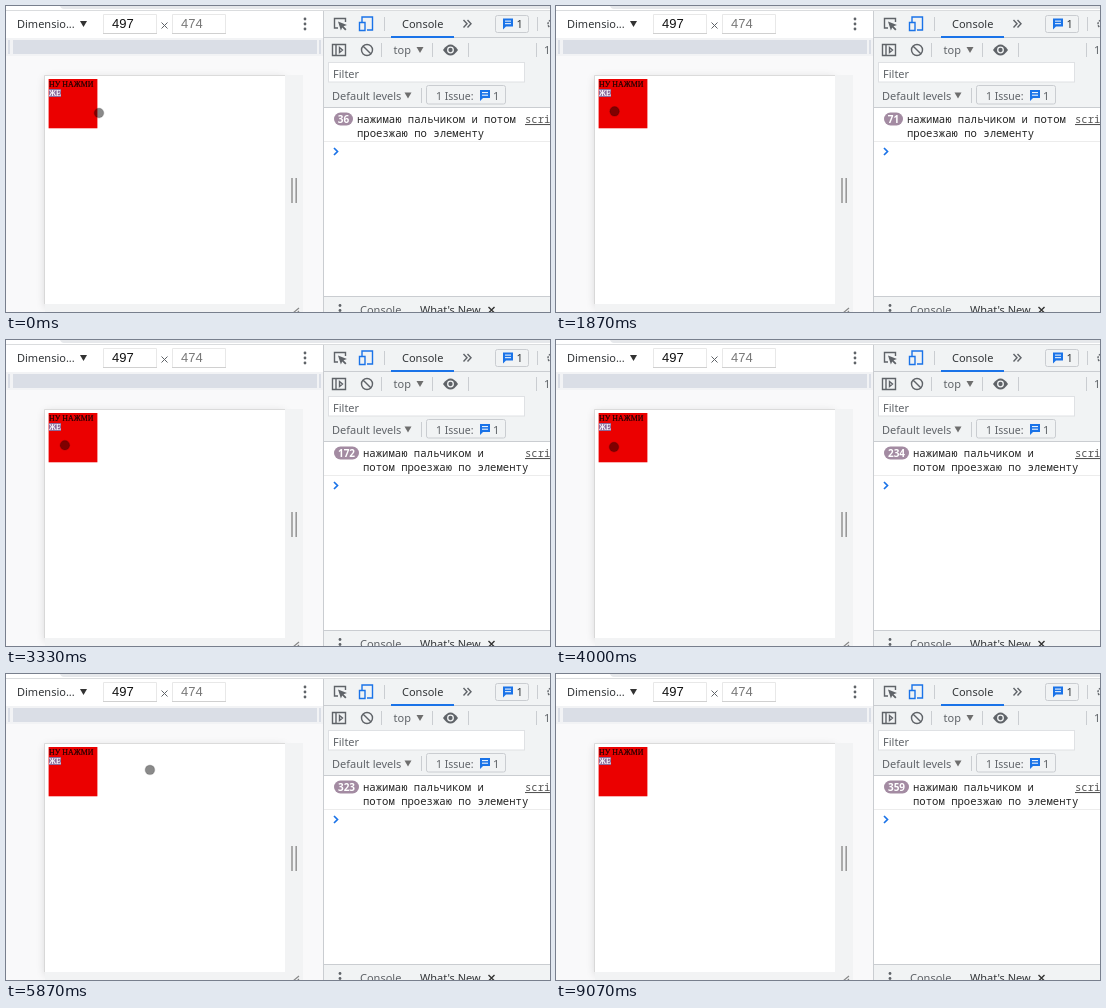
An HTML page that plays this animation: 544 by 306 pixels, repeating every 9.27 s.

```html
<!DOCTYPE html>
<html lang="ru">
<head>
<meta charset="utf-8">
<title>Touch move counter</title>
<style>
  html, body { margin: 0; width: 100%; height: 100%; overflow: hidden; background: #fff; }
  svg { display: block; width: 100vw; height: 100vh; }
  text { font: 11px "Noto Sans", sans-serif; fill: #5f6368; white-space: pre; }
  .dark { fill: #333639; }
  .field { font: 13px "Liberation Sans", Arial, sans-serif; fill: #111; }
  .muted { fill: #777; }
  .small { font-size: 10.5px; }
  .log { font: 10.6px "Noto Sans Mono", monospace; fill: #222; }
  .page { font: 7.9px "Liberation Serif", "Times New Roman", serif; fill: #200; stroke: #200; stroke-width: .2; }
  .page.selected { fill: #fff; stroke: #fff; }
  .badge { font: bold 10px "Noto Sans", sans-serif; fill: #fff; text-anchor: middle; }
  .line { stroke: #cacdd1; fill: none; }
  .icon { stroke: #5f6368; stroke-width: 1.4; fill: none; }
  .blue { stroke: #1a73e8; }
</style>
</head>
<body>
<svg viewBox="0 0 544 306">
  <defs>
    <filter id="shadow" x="-10%" y="-10%" width="120%" height="120%">
      <feGaussianBlur stdDeviation="5"/>
    </filter>
    <g id="message">
      <path d="M0 0h10v8H3l-3 3z" fill="#1a73e8"/>
      <path d="M2 2.6h6M2 5.2h6" stroke="#fff"/>
    </g>
    <path id="down" d="M0 0h7l-3.500 6z"/>
    <g id="dots"><circle r="1.4"/><circle cy="5" r="1.4"/><circle cy="10" r="1.4"/></g>
  </defs>

  <!-- Device panel -->
  <rect width="544" height="306" fill="#fff"/>
  <path d="M54 0h490v3H58q-3 0-4-3" fill="#e6e8eb"/>
  <path class="line" d="M0 4.500h544" stroke-opacity=".7"/>
  <rect y="32" width="317" height="274" fill="#f9f9fa"/>
  <rect y="32" width="317" height="18" fill="#f2f3f5"/>
  <path d="M7 34h304v14H7zM2 34h2v14H2zM313 34h2v14h-2z" fill="#dadee6"/>
  <text class="dark" x="11" y="22">Dimensio...</text>
  <use href="#down" x="74" y="15" fill="#333"/>
  <path d="M97.500 8.500h53v19h-53zM166.500 8.500h53v19h-53z" fill="#fff" stroke="#e8e8e8"/>
  <path d="M97 27.500h54M166 27.500h54" stroke="#d0d0d0"/>
  <text class="field" x="106" y="22">497</text>
  <text class="field muted" x="175" y="22">474</text>
  <path class="icon" d="M155.500 16.500l6 6m0-6l-6 6" style="stroke-width:1"/>
  <use href="#dots" x="299" y="13" fill="#5f6368"/>

  <rect x="39" y="72" width="240" height="229" opacity=".15" filter="url(#shadow)"/>
  <path d="M279 69h18v237H39v-8h240z" fill="#f2f3f4"/>
  <rect x="38.500" y="69" width="240.500" height="229" fill="#fff"/>
  <path d="M38.500 298V69.500H279" stroke="#ccc" stroke-width=".7" fill="none"/>
  <path d="M286 172v25M290.200 172v25" stroke="#999" stroke-width="1.600"/>
  <path d="M287 307l6-5M291 307l2-2" stroke="#888" stroke-width="1.200"/>

  <rect x="42.600" y="73" width="48.800" height="49.300" fill="#eb0000"/>
  <text class="page" x="43" y="81">НУ НАЖМИ</text>
  <rect x="43" y="83" width="12" height="8" fill="#8b6a9a"/>
  <text class="page selected" x="43" y="89.800">ЖЕ</text>
  <circle id="touch" r="4.700" fill-opacity=".46" stroke="#000" stroke-width="1.400" stroke-opacity=".16"/>

  <!-- Console panel -->
  <rect x="317" y="5" width="227" height="97" fill="#f1f3f4"/>
  <path class="line" d="M317.500 5v301M318 31.500h226M318 101.500h226"/>

  <path class="icon" d="M332 22h-3.500v-9.500h11V16"/>
  <path d="M332 15.500l9 3.500-3.500 1.300 3 3-1.300 1.200-3-3-1.300 3z" fill="#5f6368"/>
  <path class="icon blue" d="M356 16v-5h10.500v13H361M353.500 16.500h5.500v8h-5.500z"/>
  <path class="line" d="M378.500 11v14M531.500 11v14M375.500 37v14M426.500 37v14M462.500 37v14M530.500 37v14M415.500 82v15"/>
  <text class="dark" x="396" y="22">Console</text>
  <path d="M385 31h63" stroke="#1a73e8" stroke-width="2"/>
  <path class="icon" d="M457.500 14l3.500 3.700-3.500 3.700M461.500 14l3.500 3.700-3.500 3.700"/>
  <rect class="line" x="489.500" y="9.500" width="33" height="17" rx="2"/>
  <use href="#message" x="497" y="12.500"/>
  <text class="dark" x="510.500" y="22">1</text>
  <circle class="icon" cx="546" cy="18" r="4" stroke-dasharray="2 1"/>

  <path class="icon" d="M326.500 38.500h13v11h-13zM330 38.500v11M333.500 41.500l3 2.500-3 2.500z"/>
  <path class="icon" d="M357.200 40.200l7.600 7.600" stroke-width="1.700"/>
  <circle class="icon" cx="361" cy="44" r="5.500"/>
  <text x="387.500" y="48">top</text>
  <use href="#down" x="410.500" y="41" fill="#6e6e6e"/>
  <path d="M437 44q7.500-11 15 0q-7.500 11-15 0z" fill="#5f6368"/>
  <circle cx="444.500" cy="44" r="2.800" fill="#5f6368" stroke="#f1f3f4" stroke-width="1.300"/>
  <text x="538" y="48">1 hidden</text>

  <rect x="322.500" y="56.500" width="196" height="19.500" fill="#fff" stroke="#dfe1e4"/>
  <text x="327" y="71.500">Filter</text>
  <text x="326" y="93.500">Default levels</text>
  <use href="#down" x="398.500" y="86.500" fill="#6e6e6e"/>
  <rect class="line" x="420.500" y="79.500" width="79" height="18.500" rx="2"/>
  <text class="small" x="430" y="93.500">1 Issue:</text>
  <use href="#message" x="474" y="84"/>
  <text x="487" y="93.500">1</text>

  <rect id="pill" x="328" y="106.500" height="13" rx="6.500" fill="#a38ba2"/>
  <text id="count" class="badge" y="116.800"></text>
  <text id="first" class="log" y="117"></text>
  <text id="second" class="log" y="131"></text>
  <text class="log" x="519" y="117" text-decoration="underline" style="fill:#555">script.js</text>
  <path d="M318 135.500h226" stroke="#ececec"/>
  <path class="icon blue" d="M328 142l3.500 3.500-3.500 3.500" style="stroke-width:1.700"/>

  <rect x="318" y="291" width="226" height="15" fill="#f1f3f4"/>
  <path class="line" d="M318 290.500h226"/>
  <use href="#dots" x="334" y="299.500" fill="#5f6368"/>
  <text x="354" y="308">Console</text>
  <text class="dark" x="414" y="308">What's New</text>
  <path class="icon" d="M482.500 301l6 6m0-6l-6 6" style="stroke:#333"/>
</svg>
<script>
  const LOOP = 9270, STEP = 1000 / 15;
  const el = id => document.getElementById(id);
  const touch = el('touch'), pill = el('pill'), count = el('count');
  const first = el('first'), second = el('second');

  // Key moments; longer stretches between them are scribbled.
  const keys = [
    { at: 0, x: 93, y: 107, n: 36 },
    { at: 733, x: 54, y: 111, n: 36 },
    { at: 1067, x: 54, y: 111, n: 36 },
    { at: 2600, x: 73, y: 88, n: 103 },
    { at: 4000, x: 58, y: 107, n: 234 },
    { at: 5867, x: 144, y: 96, n: 323 },
    { at: 6600, x: 149, y: 138, n: 323 },
    { at: 6933, x: 123, y: 93, n: 323 },
    { at: 7133, x: 123, y: 93, n: 323 },
    { at: 7333, x: 81, y: 106, n: 323 },
    { at: 8067, x: 112, y: 104, n: 359 },
    { at: 8733, x: 272, y: 212, n: 359 }
  ];
  const mix = (a, b, k) => a + (b - a) * k;

  function pose(time) {
    const next = keys.findIndex(key => key.at > time);
    if (next < 0) return { n: keys[keys.length - 1].n, hidden: true };
    const a = keys[next - 1], b = keys[next], span = b.at - a.at;
    const k = (time - a.at) / span, eased = k * k * (3 - 2 * k);
    const strokes = b.n > a.n || next === 1 ? Math.floor(span / 450) : 0;
    const phase = 2 * Math.PI * strokes * k;
    return {
      x: mix(a.x, b.x, eased) + 14 * Math.sin(phase),
      y: mix(a.y, b.y, eased) + 9 * Math.sin(phase * 2),
      n: Math.round(mix(a.n, b.n, k))
    };
  }

  function draw(now) {
    const time = Math.floor(now % LOOP / STEP + .06) * STEP;
    const { x, y, n, hidden } = pose(time);
    touch.style.display = hidden ? 'none' : '';
    if (!hidden) touch.setAttribute('transform', `translate(${x} ${y})`);

    const wide = n > 99, width = wide ? 25 : 19;
    pill.setAttribute('width', width);
    count.setAttribute('x', 328 + width / 2);
    count.textContent = n;
    for (const row of [first, second]) row.setAttribute('x', wide ? 357 : 351);
    first.textContent = 'нажимаю пальчиком и' + (wide ? '' : ' потом');
    second.textContent = (wide ? 'потом ' : '') + 'проезжаю по элементу';
    requestAnimationFrame(draw);
  }
  draw(performance.now());
</script>
</body>
</html>
```
